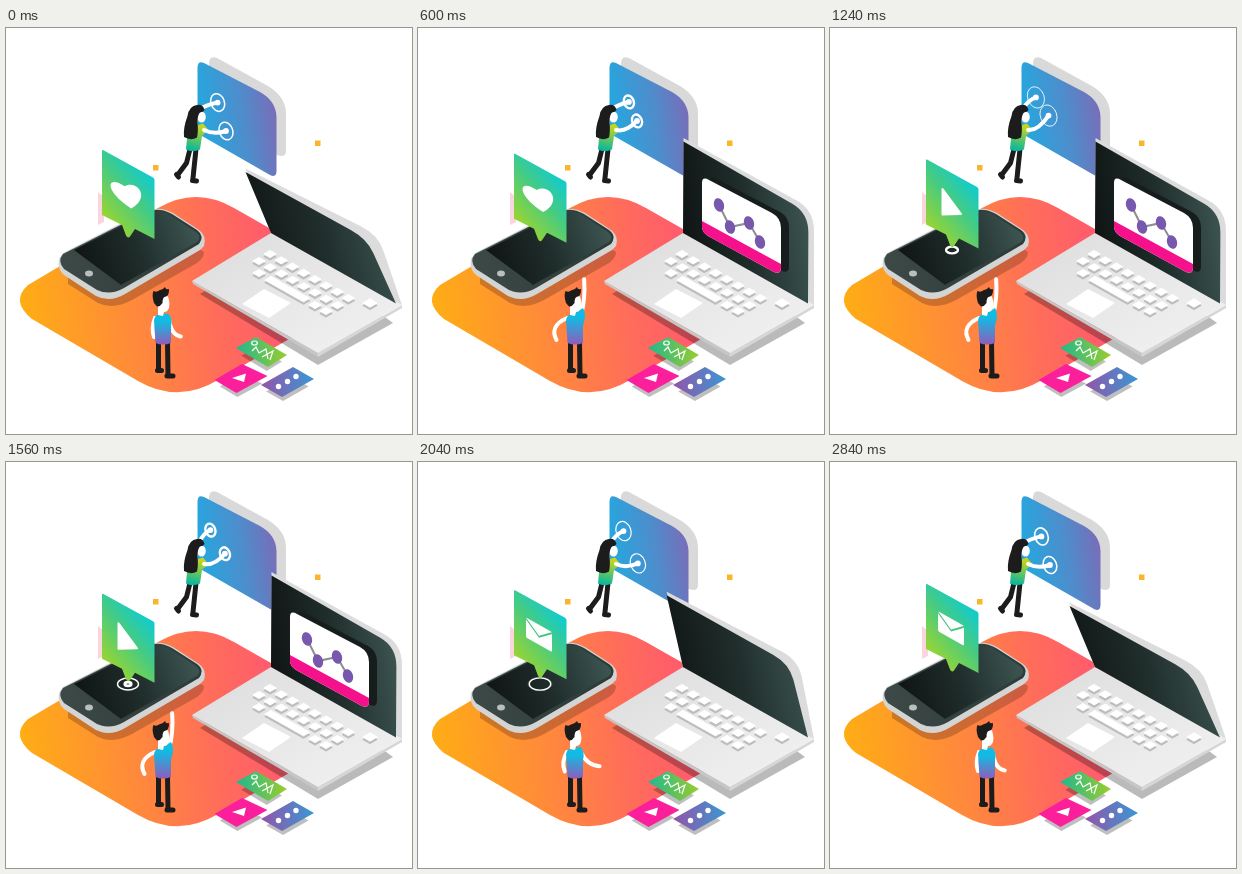
An HTML page for the animation above (2.88 s loop, 406x406 px).

```html
<!DOCTYPE html>
<html lang="en">
<head>
<meta charset="utf-8">
<title>Isometric devices</title>
<style>
  html, body { margin: 0; width: 100%; height: 100%; overflow: hidden; background: #fff; }
  svg { display: block; width: 100%; height: 100%; }
  .limb, .leg { fill: none; stroke: #fff; stroke-width: 4; stroke-linecap: round; stroke-linejoin: round; }
  .leg { stroke: #1c1c1c; stroke-width: 5; }
  .ring { fill: none; stroke: #fff; }
</style>
</head>
<body>
<svg viewBox="0 0 406 406">
  <defs>
    <linearGradient id="floor" gradientUnits="userSpaceOnUse" x1="14" y1="280" x2="275" y2="255">
      <stop stop-color="#ffad14"/><stop offset=".48" stop-color="#ff8540"/>
      <stop offset=".75" stop-color="#ff6c5b"/><stop offset="1" stop-color="#ff5a6e"/>
    </linearGradient>
    <linearGradient id="panel" gradientUnits="userSpaceOnUse" x1="191" y1="95" x2="276" y2="82">
      <stop stop-color="#22a9e0"/><stop offset=".55" stop-color="#4f8ccb"/><stop offset="1" stop-color="#7f68b5"/>
    </linearGradient>
    <linearGradient id="bubbleFill" gradientUnits="userSpaceOnUse" x1="148" y1="148" x2="98" y2="190">
      <stop stop-color="#0ccbd6"/><stop offset=".45" stop-color="#45cb83"/><stop offset="1" stop-color="#9ad530"/>
    </linearGradient>
    <linearGradient id="glass" x1="0" y1=".6" x2="1" y2=".4">
      <stop stop-color="#0f1414"/><stop offset=".5" stop-color="#1f2d2b"/><stop offset="1" stop-color="#3d5551"/>
    </linearGradient>
    <linearGradient id="bezel"><stop stop-color="#3c4947"/><stop offset="1" stop-color="#2c3a38"/></linearGradient>
    <linearGradient id="metal" x1="0" y1="0" x2="1" y2="1">
      <stop stop-color="#dcdcdc"/><stop offset="1" stop-color="#f3f3f3"/>
    </linearGradient>
    <linearGradient id="dress" x1=".6" y1="0" x2=".4" y2="1">
      <stop offset=".1" stop-color="#c3d422"/><stop offset="1" stop-color="#06b6a0"/>
    </linearGradient>
    <linearGradient id="shirt" x1="0" y1="0" x2="0" y2="1">
      <stop offset=".25" stop-color="#10bce4"/><stop offset="1" stop-color="#8f5cba"/>
    </linearGradient>
    <linearGradient id="greenTile"><stop stop-color="#1fb890"/><stop offset="1" stop-color="#9bcc2c"/></linearGradient>
    <linearGradient id="purpleTile"><stop stop-color="#9354a8"/><stop offset="1" stop-color="#3a97d3"/></linearGradient>
  </defs>

  <path fill="url(#floor)" d="M22 257 152 180Q190 158 228 180L330 238Q356 256 330 284L212 352Q172 376 132 353L26 291Q4 273 22 257"/>
  <path fill="#f9b52b" d="M147 137h5.5v5.5h-5.5zM309 112.500h5.500v5.500h-5.500z"/>

  <!-- wall panel and woman -->
  <path fill="#d9d9d9" d="M203 36Q203 27 211 30L262 58Q280 69 280 86L280 124Q279 130 271 127L203 90Z"/>
  <path fill="url(#panel)" d="M191.500 40Q191.500 32 198 35L254 64Q270 73 270.500 89V143Q270.500 150 264 147L196 108Q191.500 105 191.500 100Z"/>
  <g id="panelRings"></g>
  <path id="reachTop" class="limb"/>
  <path class="leg" d="M184 121 180.500 135 172 146.500M190 121 187 150"/>
  <path class="leg" stroke-width="4" d="M170.500 146.500 172.500 149M186.500 152.500 190.500 153"/>
  <path fill="url(#dress)" d="M189 98 197 95.500 202.500 102 196 108 194 121.500Q186 125 180 121.500L181 110Z"/>
  <ellipse cx="195.500" cy="89" rx="4.300" ry="5.500" fill="#fff"/>
  <path fill="#1c1c1c" d="M191 77Q183 78 181.500 88Q177 100 178 109Q185 113 191 109.500Q192.500 103 191.500 94Q191.500 87 194 84.500Q197 84 198.500 82Q197 76 191 77"/>
  <path id="reachLow" class="limb"/>
  <g id="hands" fill="#fff"><circle r="2.900"/><circle r="2.900"/></g>

  <!-- phone -->
  <path fill="#7a3a20" opacity=".38" d="M62 242 150 194 198 224Q198 230 191 235L126 272Q107 282 92 275L62 256Z"/>
  <path fill="#d3d5d5" d="M57 225 137 184Q152 177 167 185L193 202Q201 208 198 218L194 222 119 266Q104 275 90 268L58 247Q51 241 53 231Z"/>
  <path fill="url(#bezel)" d="M57 226 138 185Q152 178 166 186L191 202Q199 208 193 216L118 260Q104 268 91 262L58 241Q51 233 57 226"/>
  <path fill="url(#glass)" d="M68 222 139 186Q152 180 164 187L190 204Q196 209 191 214L115 257Z"/>
  <ellipse cx="83" cy="245.500" rx="4" ry="3" fill="#b9bfbf"/>
  <g id="phoneRings"></g>
  <path fill="#fbd5de" d="M92 164 98 169V194L92 197Z"/>
  <g id="bubble">
    <path fill="url(#bubbleFill)" d="M97 122 147 149.500Q148.500 150 148.500 152V211L129 201 124 208.500Q122 211 120 207.500L116 197 96 187V123Q96 121.500 97 122"/>
    <g id="icons" fill="#fff">
      <path transform="translate(121 166) rotate(-16) skewY(26)" d="M0 15C-22 0-14-18 0-8C14-18 22 0 0 15"/>
      <path d="M112.500 151.500V177L131 176.500Z" stroke="#fff" stroke-width="2" stroke-linejoin="round"/>
      <g transform="matrix(1 .56 0 1 121 166.500)">
        <rect x="-13" y="-10" width="26" height="20" rx="1.500"/>
        <path d="M-13-9 0 2 13-9" fill="none" stroke="#41c67d" stroke-width="1.500"/>
      </g>
    </g>
  </g>

  <!-- laptop -->
  <path opacity=".27" d="M194 266 312 337 387 295 372 284 220 250Z"/>
  <path fill="#c6c6c6" d="M186 253 312 325V329L187 256Z"/>
  <path fill="#d6d6d6" d="M312 325 396 277V280L312 329Z"/>
  <path fill="url(#metal)" d="M186 253 265 205 396 277 312 325Z"/>
  <path fill="#fff" d="M236 276 258 261 285 275 263 290Z"/>
  <g id="keys"></g>
  <circle cx="327" cy="187.500" r=".8" fill="#333"/>
  <path id="lidFrame" fill="#dcdcdc"/>
  <path id="lidGlass" fill="url(#glass)"/>
  <g id="display">
    <path id="plate" fill="#171d1d" transform="translate(8 -1)" d="M284 155Q284 148 291 152L354 185Q363 190 363 200V239Q363 247 356 244L290 208Q284 204 284 199Z"/>
    <path fill="#fff" d="M284 155Q284 148 291 152L354 185Q363 190 363 200V239Q363 247 356 244L290 208Q284 204 284 199Z"/>
    <path fill="#f5108c" d="M284 193 363 236V239Q363 247 356 244L290 208Q284 204 284 199Z"/>
    <path d="M301 177 312 199 331 195 342 214" fill="none" stroke="#8d8d96" stroke-width="2"/>
    <g id="nodes" fill="#7858ad"></g>
  </g>

  <!-- tiles -->
  <g id="tiles"></g>
  <path fill="#fff" d="M226 350 240 345.500 238 354Z"/>
  <g fill="none" stroke="#fff" stroke-width="1.200">
    <ellipse cx="248.500" cy="315" rx="2.800" ry="2"/>
    <path d="M246 323 250 319 253 325 260 321 262 331M256 329 267 323 264 332"/>
  </g>
  <g fill="#fff"><circle cx="272.500" cy="358.500" r="2.700"/><circle cx="281.500" cy="353.500" r="2.700"/><circle cx="290" cy="348.500" r="2.700"/></g>

  <!-- man -->
  <path id="backArm" class="limb"/>
  <path class="leg" stroke-linecap="butt" d="M152.500 314V342M161.500 314 162 347"/>
  <path class="leg" d="M151.500 342.500 155.500 342.500M161 348 167 348"/>
  <path id="frontArm" class="limb"/>
  <path id="torso" fill="url(#shirt)"/>
  <path fill="#fff" d="M152 269Q160 264 162.500 270Q164.500 278 162 282Q160 284.500 158 284L157 288 152 287Z"/>
  <path fill="#1c1c1c" d="M148 275Q145.500 267 147.500 263Q151 264.500 153 262.500Q157 262 159 259Q159.500 262 163 261Q163.500 268 158.500 269Q156.500 270 156.500 275Q154 279 151 278.500Z"/>
</svg>
<script>
const LOOP = 2880, STEP = 40;
const $ = id => document.getElementById(id);
const clamp = x => Math.max(0, Math.min(1, x));
const ramp = (t, from, to) => clamp((t - from) / (to - from));
const smooth = x => x * x * (3 - 2 * x);
const mix = (a, b, k) => a + (b - a) * k;
const mixPoint = (a, b, k) => [mix(a[0], b[0], k), mix(a[1], b[1], k)];
const pulse = (t, up, upEnd, down, downEnd) => ramp(t, up, upEnd) - ramp(t, down, downEnd);

function set(el, attrs) {
  for (const name in attrs) el.setAttribute(name, attrs[name]);
}
function add(parent, tag, attrs) {
  const el = document.createElementNS('http://www.w3.org/2000/svg', tag);
  set(el, attrs);
  parent.append(el);
  return el;
}

function addKey(x, y, span = 0, size = 1) {
  const w = 6.2 * size, h = 3.6 * size, dx = span * 11.2, dy = span * 6.3;
  const d = `M${x - w} ${y}L${x} ${y - h}L${x + w + dx} ${y + dy}L${x + dx} ${y + h + dy}Z`;
  const round = { d, 'stroke-width': 1, 'stroke-linejoin': 'round' };
  add($('keys'), 'path', { ...round, fill: '#bdbdbd', stroke: '#bdbdbd', transform: 'translate(0 2.5)' });
  add($('keys'), 'path', { ...round, fill: '#fff', stroke: '#fff' });
}
for (let i = 0; i < 8; i++) addKey(264 + i * 11.2, 226 + i * 6.3);
for (let i = 0; i < 8; i++) addKey(253 + i * 11.2, 233 + i * 6.3);
addKey(253, 245);
addKey(265, 252, 2.9);
addKey(309, 277);
addKey(320, 283);
addKey(364, 275, 0, 1.15);

for (const [cx, cy] of [[301, 177], [312, 199], [331, 195], [342, 214]])
  add($('nodes'), 'ellipse', { cx, cy, rx: 5, ry: 7, transform: `rotate(-18 ${cx} ${cy})` });

const tiles = [
  [[235, 350], 'M208.500 352 236 336 261.500 348 230.500 365Z', '#fb1f9c'],
  [[256, 324], 'M230 320 250 309 281 327 262 339Z', 'url(#greenTile)'],
  [[281, 354], 'M255 357 287 339 308 351 276 369Z', 'url(#purpleTile)']
];
for (const [[x, y], d, fill] of tiles) {
  add($('tiles'), 'path', { d, opacity: .25, transform: `translate(${x} ${y + 7}) scale(.8) translate(${-x} ${-y})` });
  add($('tiles'), 'path', { d, fill });
}

const makeRings = id => [0, 1].map(() => add($(id), 'ellipse', { class: 'ring' }));
const panelRings = makeRings('panelRings'), phoneRings = makeRings('phoneRings');

function lidPath(topLeft, corner, hingeRight, hingeLeft) {
  const start = mixPoint(corner, topLeft, .13), end = mixPoint(corner, hingeRight, .22);
  return `M${topLeft}L${start}Q${corner} ${end}L${hingeRight}L${hingeLeft}Z`;
}

function drawLaptop(t) {
  const open = smooth(ramp(t, 0, 280)) - smooth(ramp(t, 1800, 2200));
  const topLeft = mixPoint([239.5, 140.5], [265.5, 110], open);
  const corner = mixPoint([372, 207], [396, 182], open);
  set($('lidFrame'), { d: lidPath(topLeft, corner, [396, 277], [265, 205]) });
  const inner = mixPoint([361, 211], [390.5, 185], open);
  set($('lidGlass'), { d: lidPath([topLeft[0], topLeft[1] + 3.5], inner, [390, 275.5], [265, 205]) });
  set($('display'), { opacity: pulse(t, 200, 480, 1680, 1900) });
}

function drawMan(t) {
  const up = smooth(ramp(t, 0, 280)) - smooth(ramp(t, 1680, 2150));
  const shoulder = [163, mix(291, 287, up)];
  const angle = mix(56, -85, up) * Math.PI / 180, reach = mix(21, 36, up);
  const hand = [shoulder[0] + reach * Math.cos(angle), shoulder[1] + reach * Math.sin(angle)];
  const middle = mixPoint(shoulder, hand, .5);
  const elbow = [middle[0] + mix(-4, 3, up), middle[1] + mix(7, 2, up)];
  set($('frontArm'), { d: `M${shoulder}Q${elbow} ${hand}` });
  const backElbow = mixPoint([145, 300], [131, 298], up), backHand = mixPoint([148, 309], [138.5, 312], up);
  set($('backArm'), { d: `M149 290Q${backElbow} ${backHand}` });
  set($('torso'), { d: `M148 292Q149 286 155 286L${mix(162, 165, up)} ${mix(285.5, 280, up)}Q${mix(167, 169, up)} ${mix(290, 286, up)} 165 298V315Q157 318 149.500 315Z` });
}

function drawWoman(t) {
  const sway = Math.cos((t - 230) / LOOP * 2 * Math.PI);
  const lift = smooth(ramp(t, 150, 900)) - smooth(ramp(t, 1200, 2250));
  const hands = [[208.2 + 3.9 * sway, 71.5 + 3.5 * sway], [220 - 1.5 * lift, 103 - 15.5 * lift]];
  const [top, low] = hands;
  set($('reachTop'), { d: `M192 82Q${mix(194, top[0], .4)} ${top[1] + 2} ${top}` });
  set($('reachLow'), { d: `M198 102Q208 ${mix(107, 103, lift)} ${low}` });
  const age = (t / 960 + .545) % 1;
  hands.forEach(([cx, cy], i) => {
    set($('hands').children[i], { cx, cy });
    set(panelRings[i], {
      cx, cy, rx: 4 + 5 * age, ry: 5.5 + 6.5 * age, transform: `rotate(-20 ${cx} ${cy})`,
      'stroke-width': 2.8 - 2.4 * age, opacity: Math.min(ramp(age, .01, .08), ramp(1 - age, 0, .15))
    });
  });
}

function drawPhone(t) {
  set($('bubble'), { transform: `translate(0 ${5 * (1 - Math.cos(t / LOOP * 2 * Math.PI))})` });
  [...$('icons').children].forEach((icon, i) => set(icon, { visibility: Math.floor(t / 960) === i ? 'visible' : 'hidden' }));
  [980, 1430].forEach((start, i) => {
    const age = t - start, p = clamp(age / 900), radius = 12 * (1 - (1 - p) ** 2);
    set(phoneRings[i], {
      cx: 122, cy: 222, rx: radius, ry: radius * .57,
      'stroke-width': .5 + 2.6 * (1 - p), opacity: age > 0 ? clamp((1200 - age) / 500) : 0
    });
  });
}

function draw(now) {
  const t = Math.floor((now % LOOP) / STEP) * STEP;
  drawLaptop(t);
  drawMan(t);
  drawWoman(t);
  drawPhone(t);
}

const begin = performance.now();
function tick() {
  draw(performance.now() - begin);
  requestAnimationFrame(tick);
}
tick();
</script>
</body>
</html>
```
